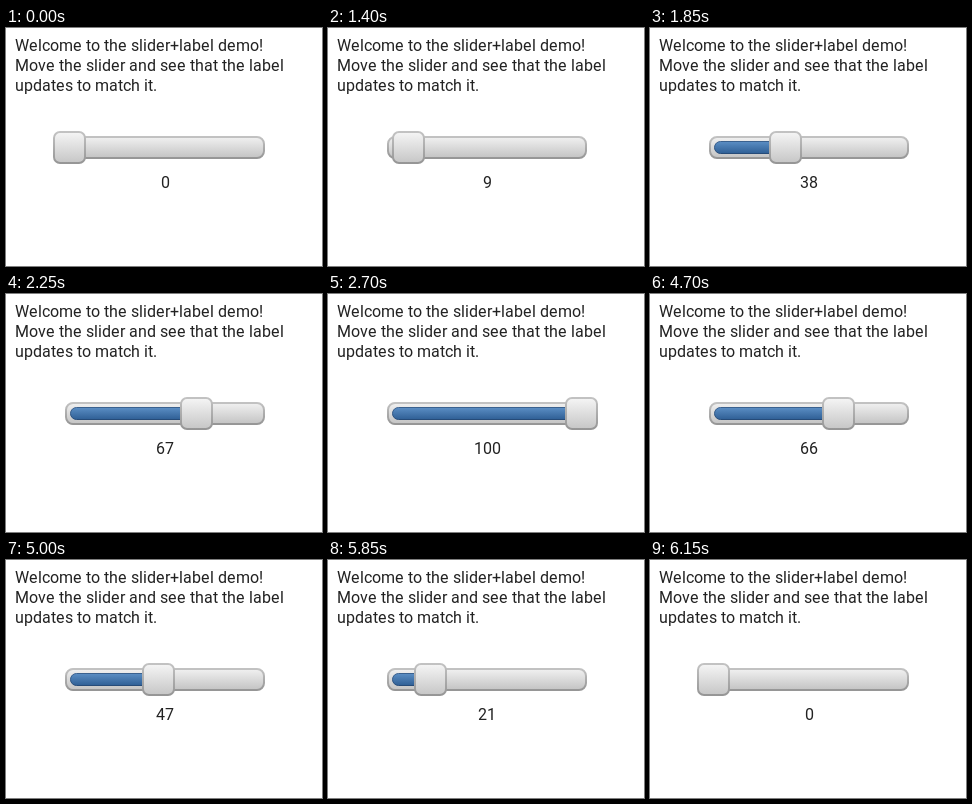
Write an HTML page that moves like this. It is 316 px wide and 238 px high and loops after 7400 ms.

```html
<!DOCTYPE html>
<html lang="en">
<head>
<meta charset="utf-8">
<title>Slider and label</title>
<style>
  html, body { margin: 0; width: 100%; height: 100%; overflow: hidden; background: #fff; }
  svg { display: block; }
  text { font: 16px Roboto, sans-serif; font-kerning: none; fill: #222; }
</style>
</head>
<body>
<svg width="316" height="238" viewBox="0 0 316 238">
  <defs>
    <linearGradient id="track" x2="0" y2="1">
      <stop offset="0" stop-color="#f1f1f1"/>
      <stop offset="1" stop-color="#c3c3c3"/>
    </linearGradient>
    <linearGradient id="knob" x2="0" y2="1">
      <stop offset="0" stop-color="#f5f5f5"/>
      <stop offset="1" stop-color="#c6c6c6"/>
    </linearGradient>
    <linearGradient id="edge" x2="0" y2="1">
      <stop offset="0" stop-color="#c2c2c2"/>
      <stop offset="1" stop-color="#969696"/>
    </linearGradient>
    <linearGradient id="blue" x2="0" y2="1">
      <stop offset="0" stop-color="#5b8ec4"/>
      <stop offset="1" stop-color="#2f5f95"/>
    </linearGradient>
    <linearGradient id="blueEdge" x2="0" y2="1">
      <stop offset="0" stop-color="#3a618f"/>
      <stop offset="1" stop-color="#264b78"/>
    </linearGradient>
  </defs>
  <g id="intro"></g>
  <rect x="60" y="109" width="198" height="21" rx="7" fill="url(#track)" stroke="url(#edge)" stroke-width="2"/>
  <rect id="bar" x="64.5" y="113.5" height="12" rx="6" fill="url(#blue)" stroke="url(#blueEdge)"/>
  <rect id="thumb" y="104" width="31" height="31" rx="6" fill="url(#knob)" stroke="url(#edge)" stroke-width="2"/>
  <text id="label" y="160"></text>
</svg>
<script>
  const LOOP = 7400, TICK = 50;
  const $ = id => document.getElementById(id);
  const pen = document.createElement('canvas').getContext('2d');
  pen.font = '16px Roboto, sans-serif';

  // Glyph advances snap to whole pixels.
  const advance = ch => Math.round(pen.measureText(ch).width + 0.05);
  const widthOf = str => [...str].reduce((sum, ch) => sum + advance(ch), 0);

  function setText(node, str, x) {
    const xs = [...str].map(ch => {
      const at = x;
      x += advance(ch);
      return at;
    });
    node.textContent = str;
    node.setAttribute('x', xs.join(' '));
  }

  [
    'Welcome to the slider+label demo!',
    'Move the slider and see that the label',
    'updates to match it.'
  ].forEach((line, i) => {
    const node = document.createElementNS('http://www.w3.org/2000/svg', 'text');
    node.setAttribute('y', 23 + 20 * i);
    setText(node, line, 9);
    $('intro').append(node);
  });

  // Number of ticks into a drag, counting its first tick as 1.
  const ticks = (t, start, end) => (Math.min(t, end) - start) / TICK + 1;

  function valueAt(t) {
    if (t < 1400) return 0;
    if (t < 3600) {
      const p = (Math.min(t, 2700) - 1450) / 1250;
      return Math.round(9 + 91 * Math.max(0, p));
    }
    if (t < 4700) {
      const n = ticks(t, 3600, 4300);
      return 97 - 3 * Math.floor((n - 1) * 10 / 14);
    }
    if (t < 5850) {
      const n = ticks(t, 4700, 5200);
      return 67 - Math.round(1.016 * n + 0.263 * n * n);
    }
    return Math.round(24 * (1 - ticks(t, 5850, 6150) / 7));
  }

  let shown = -1;
  function draw(now) {
    const t = Math.floor((now % LOOP) / TICK) * TICK;
    const value = valueAt(t);
    if (value === shown) return;
    shown = value;
    const x = 47 + Math.floor(value * 1.9);
    $('thumb').setAttribute('x', x + 1);
    $('bar').setAttribute('width', Math.max(0, x + 16 - 64));
    const str = String(value);
    setText($('label'), str, Math.round(159 - widthOf(str) / 2));
  }

  function frame() {
    draw(performance.now());
    requestAnimationFrame(frame);
  }
  frame();
</script>
</body>
</html>
```
